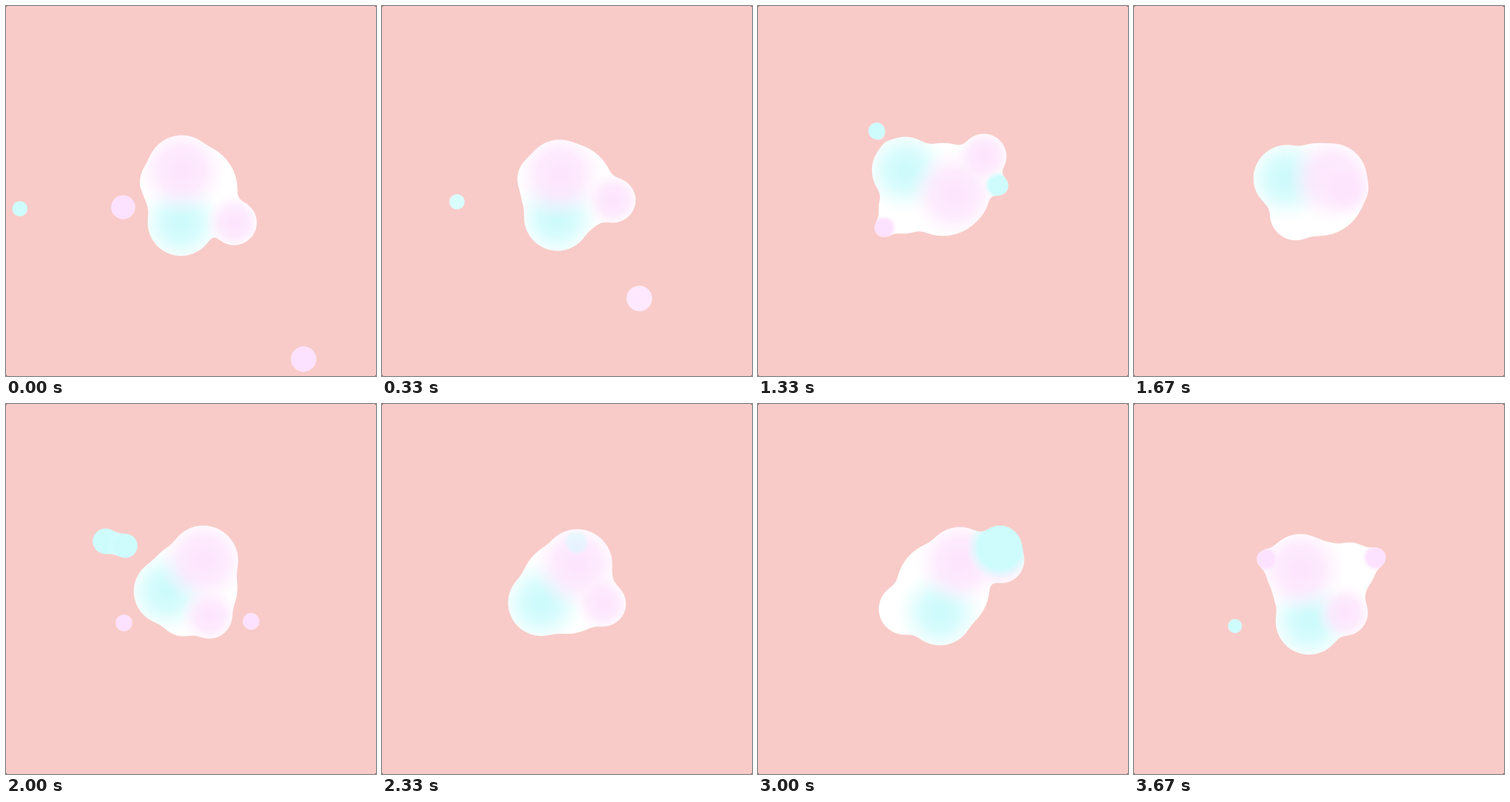
An HTML page for the animation above (3740 ms loop, 480x480 px).

```html
<!DOCTYPE html>
<html lang="en">
<head>
<meta charset="utf-8">
<title>Blob</title>
<style>
  html, body { margin: 0; width: 100%; height: 100%; overflow: hidden; background: #444; }
  svg { display: block; width: 480px; height: 480px; background: #f8cbc8; border-radius: 2px; }
</style>
</head>
<body>
<svg viewBox="0 0 480 480">
  <defs>
    <filter id="goo" filterUnits="userSpaceOnUse" x="-60" y="-60" width="600" height="600">
      <feGaussianBlur stdDeviation="7"/>
      <feColorMatrix values="1 0 0 0 0  0 1 0 0 0  0 0 1 0 0  0 0 0 18 -5.8"/>
    </filter>
    <mask id="shape" maskUnits="userSpaceOnUse" x="0" y="0" width="480" height="480">
      <g id="body" filter="url(#goo)" fill="#fff"></g>
    </mask>
    <radialGradient id="cyan">
      <stop offset=".1" stop-color="#cdfafb"/>
      <stop offset=".45" stop-color="#d0fbfc" stop-opacity=".8"/>
      <stop offset="1" stop-color="#e0fdfd" stop-opacity="0"/>
    </radialGradient>
    <radialGradient id="pink">
      <stop offset=".1" stop-color="#fde5fd"/>
      <stop offset=".5" stop-color="#fde6fd" stop-opacity=".8"/>
      <stop offset="1" stop-color="#fef0fe" stop-opacity="0"/>
    </radialGradient>
    <radialGradient id="cyanDrop">
      <stop offset=".65" stop-color="#cefcfd"/>
      <stop offset="1" stop-color="#e0fdfd" stop-opacity="0"/>
    </radialGradient>
    <radialGradient id="pinkDrop">
      <stop offset=".65" stop-color="#fde2ff"/>
      <stop offset="1" stop-color="#fef0fe" stop-opacity="0"/>
    </radialGradient>
  </defs>
  <g mask="url(#shape)">
    <rect width="480" height="480" fill="#fff"/>
    <g id="paint"></g>
  </g>
</svg>
<script>
const LOOP = 3740, STEP = 200 / 3, LAST = 55;
const CX = 240, CY = 238;
const beats = [0, 11, 20, 30, 40, 45, LAST];
const body = document.getElementById('body');
const paint = document.getElementById('paint');
const parts = [];

function circle(parent, fill) {
  const el = document.createElementNS('http://www.w3.org/2000/svg', 'circle');
  el.setAttribute('fill', fill);
  return parent.appendChild(el);
}

function place(el, x, y, r) {
  el.setAttribute('cx', x);
  el.setAttribute('cy', y);
  el.setAttribute('r', r);
}

// The goo filter swells large discs and shrinks small ones.
const gooRadius = r => r - 2.5 + 30 / r;

function spline(a, b, c, d, u) {
  return b + u * ((c - a) + u * ((2 * a - 5 * b + 4 * c - d) + u * (3 * (b - c) + d - a))) / 2;
}

// A ball that wanders inside the body, passing one waypoint on each beat.
function ball(color, r, ...way) {
  const shape = circle(body, '#fff');
  const tint = circle(paint, color ? `url(#${color})` : 'none');
  const at = k => way[Math.max(0, Math.min(way.length - 1, k))];
  parts.push((n, i, u) => {
    const [x, y] = [0, 1].map(j =>
      spline(at(i - 1)[j], at(i)[j], at(i + 1)[j], at(i + 2)[j], u));
    place(shape, x, y, gooRadius(r));
    place(tint, x, y, r * 1.3);
  });
}

// A drop that springs from the centre, turns at (x, y) on step `peak` and falls back.
function drop(color, r, peak, x, y, rise = 5, fall = 5) {
  const shape = circle(body, '#fff');
  const tint = circle(paint, `url(#${color}Drop)`);
  parts.push(n => {
    const age = n < peak ? (n - peak) / rise : (n - peak) / fall;
    const shown = Math.abs(age) < 1;
    shape.style.display = tint.style.display = shown ? '' : 'none';
    if (!shown) return;
    const reach = Math.cos(age * Math.PI / 2);
    const px = CX + (x - CX) * reach, py = CY + (y - CY) * reach;
    place(shape, px, py, gooRadius(r));
    place(tint, px, py, r * 1.55);
    tint.setAttribute('opacity', Math.min(1, reach * 1.2));
  });
}

place(circle(body, '#fff'), CX, CY, gooRadius(60));
ball('', 33, [207, 228], [209, 224], [190, 262], [230, 268], [215, 216], [190, 266], [280, 213]);
ball('cyan', 43, [227, 281], [224, 260], [191, 213], [209, 243], [206, 269], [236, 270], [227, 282]);
ball('pink', 45, [228, 213], [236, 228], [255, 244], [256, 203], [252, 216], [262, 205], [216, 214]);
ball('pink', 29, [296, 281], [303, 213], [293, 195], [264, 275], [314, 230], [316, 203], [274, 271]);

drop('pink', 16, 0, 386, 458, 1, 9);
drop('cyan', 9, 0, 18, 263, 1, 9);
drop('pink', 15, 0, 152, 261);

drop('pink', 16, 9, -16, 305, 0, 8);
drop('cyan', 11, 11, 82, 179);
drop('cyan', 13, 11, 124, 179);
drop('cyan', 11, 11, 175, 286);
drop('pink', 19, 11, 286, 173);

drop('cyan', 10, 20, 154, 162);
drop('pink', 11, 20, 163, 288);
drop('cyan', 12, 20, 312, 233);

drop('cyan', 16, 30, 129, 178);
drop('cyan', 15, 30, 155, 184);
drop('pink', 10, 30, 153, 284);
drop('pink', 10, 30, 318, 282);

drop('cyan', 11, 38, 272, 85, 4, 7);
drop('cyan', 28, 45, 314, 186);

drop('cyan', 8, LAST, 131, 288);
drop('pink', 12, LAST, 314, 199);
drop('pink', 11, LAST, 171, 201);

function draw(n) {
  let i = 0;
  while (i < beats.length - 2 && n >= beats[i + 1]) i++;
  const u = (n - beats[i]) / (beats[i + 1] - beats[i]);
  parts.forEach(part => part(n, i, u));
}

// The picture advances in 15 steps per second.
const start = performance.now();
function tick() {
  const t = (performance.now() - start) % LOOP;
  draw(Math.min(LAST, Math.floor((t + 5) / STEP)));
  requestAnimationFrame(tick);
}
tick();
</script>
</body>
</html>
```
